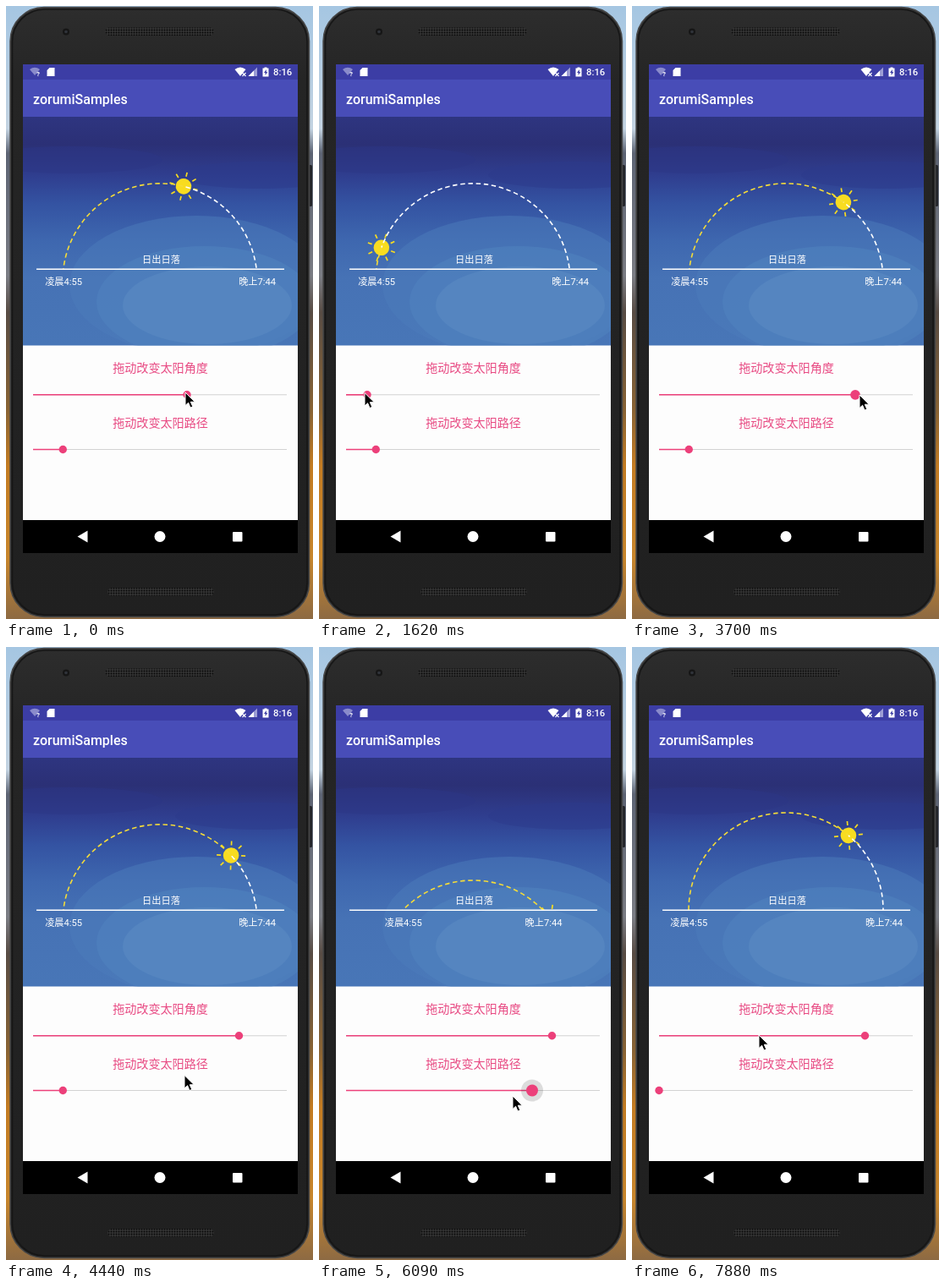
An HTML page that plays this animation: 363x725 px, repeating every 8 s.

```html
<!DOCTYPE html>
<html lang="zh">
<head>
<meta charset="utf-8">
<title>Sunrise and sunset</title>
<style>
  html, body { margin: 0; width: 100%; height: 100%; overflow: hidden; background: #222; }
  svg { display: block; width: 363px; height: 725px; }
  text { font-family: Roboto, "Noto Sans CJK SC", "Noto Sans CJK", sans-serif; fill: #fff; }
  .mid { text-anchor: middle; font-size: 11.2px; }
  .pink { text-anchor: middle; font-size: 14.1px; fill: #e84a83; }
  .arc { fill: none; stroke-width: 1.6; stroke-dasharray: 5.5 3.7; }
</style>
</head>
<body>
<svg viewBox="0 0 363 725">
  <defs>
    <linearGradient id="scene" x2="0" y2="1">
      <stop offset="0" stop-color="#a5c6e2"/>
      <stop offset=".2" stop-color="#c4d4e2"/>
      <stop offset=".24" stop-color="#5d6474"/>
      <stop offset=".44" stop-color="#7b7d84"/>
      <stop offset=".5" stop-color="#584c44"/>
      <stop offset=".66" stop-color="#8a6434"/>
      <stop offset=".75" stop-color="#c47c22"/>
      <stop offset=".9" stop-color="#c8862c"/>
      <stop offset="1" stop-color="#8d6a43"/>
    </linearGradient>
    <linearGradient id="body" x2="0" y2="1">
      <stop offset="0" stop-color="#2d2d2d"/>
      <stop offset=".12" stop-color="#252525"/>
      <stop offset="1" stop-color="#202020"/>
    </linearGradient>
    <linearGradient id="sky" x2="0" y2="1">
      <stop offset="0" stop-color="#2e3580"/>
      <stop offset=".12" stop-color="#2b3076"/>
      <stop offset=".25" stop-color="#2f3d8e"/>
      <stop offset=".38" stop-color="#3453a2"/>
      <stop offset=".54" stop-color="#3e67af"/>
      <stop offset=".7" stop-color="#4672b5"/>
      <stop offset="1" stop-color="#4876b7"/>
    </linearGradient>
    <pattern id="mesh" width="3" height="3" patternUnits="userSpaceOnUse">
      <rect width="3" height="3" fill="#343434"/>
      <circle cx="1.5" cy="1.5" r="1" fill="#080808"/>
    </pattern>
    <clipPath id="skyBox"><rect x="20" y="131" width="325" height="270.5"/></clipPath>
    <clipPath id="above"><rect x="20" y="131" width="325" height="180"/></clipPath>
  </defs>

  <!-- Backdrop and phone -->
  <rect width="363" height="725" fill="url(#scene)"/>
  <rect x="357" y="188" width="5" height="49" rx="1.5" fill="#23252a"/>
  <rect x="5" y="1.5" width="353.5" height="721" rx="40" fill="url(#body)" stroke="#484848" stroke-width="1.5"/>
  <rect x="7.5" y="4" width="348.5" height="716" rx="38" fill="none" stroke="#161616" stroke-width="1.5"/>
  <circle cx="71" cy="30.5" r="4" fill="#161616"/>
  <circle cx="71" cy="30.5" r="1.8" fill="#30343a"/>
  <rect x="117" y="25.5" width="129" height="9.5" rx="4.7" fill="url(#mesh)"/>
  <rect x="120" y="688" width="126" height="9.5" rx="4.7" fill="url(#mesh)"/>

  <!-- Screen -->
  <rect x="20" y="69" width="325" height="578" fill="#fdfdfd"/>
  <rect x="20" y="69" width="325" height="18" fill="#3c3da5"/>
  <rect x="20" y="87" width="325" height="44.5" fill="#484db8"/>
  <path d="M28 75Q34 70.500 40 75L34 82Z" fill="#8a8bcb"/>
  <text x="36" y="83" font-size="8" font-weight="700" fill="#fff">?</text>
  <path d="M51.500 73H57.500V83H48.500V76Z" fill="#fff"/>
  <path d="M270.500 75Q277 70 283.500 75L277 83Z" fill="#fff"/>
  <path d="M279.500 79L283.500 83M283.500 79L279.500 83" stroke="#fff" stroke-width="1.2"/>
  <path d="M286.500 83L297 72.500V83Z" fill="#9c9dd4"/>
  <path d="M286.500 83L293 76.500V83Z" fill="#fff"/>
  <path d="M303.500 73.500H305.500V72.500H308.500V73.500H310.500V83.500H303.500Z" fill="#fff"/>
  <path d="M307.800 75L305 79H306.600V82L309.300 78H307.800Z" fill="#3c3da5"/>
  <text x="316" y="82" font-size="11.3" font-weight="500">8:16</text>
  <text x="32" y="116" font-size="16" font-weight="500">zorumiSamples</text>

  <g clip-path="url(#skyBox)">
    <rect x="20" y="131" width="325" height="271" fill="url(#sky)"/>
    <ellipse cx="75" cy="182" rx="110" ry="16" fill="#2d3685" opacity=".5"/>
    <ellipse cx="300" cy="200" rx="100" ry="16" fill="#2d3b8c" opacity=".5"/>
    <ellipse cx="225" cy="330" rx="150" ry="82" fill="#4c7dbb" opacity=".5"/>
    <ellipse cx="235" cy="350" rx="128" ry="66" fill="#5183bf" opacity=".55"/>
    <ellipse cx="238" cy="354" rx="100" ry="46" fill="#5a8bc3" opacity=".6"/>
  </g>

  <g clip-path="url(#above)">
    <g id="sun" stroke="#f8dc20" stroke-width="1.7" fill="#f8dc20">
      <circle r="9.300" stroke="none"/>
    </g>
    <path id="ahead" class="arc" stroke="#fff"/>
    <path id="done" class="arc" stroke="#f5dc38"/>
  </g>
  <path d="M36 311.300H329" stroke="#fff" stroke-width="1.6"/>
  <text class="mid" x="183.500" y="303.500">日出日落</text>
  <text class="mid" id="rise" y="330">凌晨4:55</text>
  <text class="mid" id="set" y="330">晚上7:44</text>

  <text class="pink" x="182.500" y="432.500">拖动改变太阳角度</text>
  <text class="pink" x="182.500" y="497.500">拖动改变太阳路径</text>
  <g id="sliders"></g>

  <rect x="20" y="608" width="325" height="39" fill="#000"/>
  <path d="M84.500 627.500L96.500 620.500V634.500Z" fill="#fff"/>
  <circle cx="182" cy="627.500" r="6.500" fill="#fff"/>
  <rect x="268" y="622" width="11.500" height="11.500" rx="1" fill="#fff"/>

  <path id="cursor" d="M0 0V15.500L3.600 12.200L6 18L8.800 16.800L6.300 11.200H11.300Z"
        fill="#000" stroke="#fff" stroke-width="1"/>
</svg>
<script>
const $ = id => document.getElementById(id);
const LOOP = 8000, STEP = 148.5, R = 115, CX = 182, HORIZON = 311;

// Tracks: [step, value...] with straight lines between the points
const tracks = {
  thumb1: [[0, 214], [1, 205], [5, 32], [6, 32], [9, 57], [13, 57], [14, 64], [16, 127],
           [17, 135.5], [21, 135.5], [22, 155], [25, 264], [27, 275.5]],
  press1: [[0, 0], [1, .8], [9, .8], [11, 0], [13, 0], [14, 1], [16, 1], [17, 0],
           [21, 0], [22, 1], [24, 1], [25, .5], [26, .5], [28, 0]],
  halo1: [[8, 0], [9, .6], [10, .6], [11, 0], [14, 0], [15, 1], [16, 1], [17, .45], [18, 0],
          [22, 0], [23, 1], [24, .6], [25, 0]],
  thumb2: [[36, 67.3], [37, 100], [39, 285], [40, 278], [41, 252], [44, 75], [45, 32]],
  press2: [[36, 0], [37, 1], [45, 1], [47, 0]],
  angle: [[8, 104.1], [9, 6.6], [11, 19.9], [14, 19.9], [15, 6.6], [16, 8.5], [17, 15.7],
          [19, 46], [20, 57], [21, 61.7], [22, 6.6], [23, 20], [24, 58], [25, 126.2],
          [27, 137], [31, 137], [32, 20], [36, 71.3], [37, 85], [41, 143], [44, 133], [45, 130]],
  cursor: [[0, 212, 457], [1, 205, 459], [5, 34, 472], [6, 33, 472], [9, 54, 457.5],
           [13, 54, 457.5], [17, 134, 465], [21, 134, 465], [25, 269, 460], [28, 272, 463],
           [32, 150, 550], [35, 69, 523], [36, 69, 523], [39, 285, 533], [40, 262, 533],
           [41, 229, 531], [44, 62, 528], [45, 20, 519], [46, 16, 518], [49, 230, 432],
           [50, 230, 432], [53, 150, 459]]
};

function at(name, n, col = 1) {
  const keys = tracks[name], i = keys.findIndex(k => k[0] > n);
  if (i === 0) return keys[0][col];
  if (i < 0) return keys[keys.length - 1][col];
  const a = keys[i - 1], b = keys[i];
  return a[col] + (b[col] - a[col]) * (n - a[0]) / (b[0] - a[0]);
}

function add(parent, tag, attrs) {
  const el = document.createElementNS('http://www.w3.org/2000/svg', tag);
  set(el, attrs);
  return parent.appendChild(el);
}

function set(el, attrs) {
  for (const k in attrs) el.setAttribute(k, attrs[k]);
}

function slider(y) {
  const g = $('sliders'), pink = '#ec407a';
  add(g, 'path', { d: `M32 ${y}H332`, stroke: '#d2d2d2', 'stroke-width': 1 });
  const bar = add(g, 'path', { stroke: pink, 'stroke-width': 1.6 });
  const halo = add(g, 'circle', { cy: y, r: 13 });
  const thumb = add(g, 'circle', { cy: y, fill: pink });
  return (x, press, glow) => {
    set(bar, { d: `M32 ${y}H${x}` });
    set(halo, { cx: x, 'fill-opacity': .13 * glow });
    set(thumb, { cx: x, r: 4.7 + 2.3 * press });
  };
}

const slider1 = slider(459.8), slider2 = slider(524.5);
for (let a = 0; a < 360; a += 45)
  add($('sun'), 'path', { d: 'M0-12V-17', transform: `rotate(${a})` });

function draw(ms) {
  const n = Math.min(53, Math.floor((ms % LOOP + 20) / STEP));
  const x2 = at('thumb2', n), press2 = at('press2', n);
  slider1(at('thumb1', n), at('press1', n), at('halo1', n));
  slider2(x2, press2, press2);

  // The second slider sinks the circle below the horizon
  const v = (x2 - 32) / 300, drop = v * (119.6 - 14.3 * v), cy = HORIZON + drop;
  const deg = at('angle', n), rad = deg * Math.PI / 180;
  const x = CX - R * Math.cos(rad), y = cy - R * Math.sin(rad);
  const arc = (x0, y0, x1, y1) => `M${x0} ${y0}A${R} ${R} 0 0 1 ${x1} ${y1}`;
  set($('done'), { d: arc(CX - R, cy, x, y) });
  set($('ahead'), { d: arc(x, y, CX + R, cy), 'stroke-dashoffset': R * rad });
  set($('sun'), { transform: `translate(${x} ${y}) rotate(${deg})` });

  const half = Math.sqrt(R * R - drop * drop);
  set($('rise'), { x: CX + .3 - half });
  set($('set'), { x: CX + 1 + half });
  set($('cursor'), { transform: `translate(${at('cursor', n)} ${at('cursor', n, 2)})` });
}

const start = performance.now();
(function tick() {
  draw(performance.now() - start);
  requestAnimationFrame(tick);
})();
</script>
</body>
</html>
```
